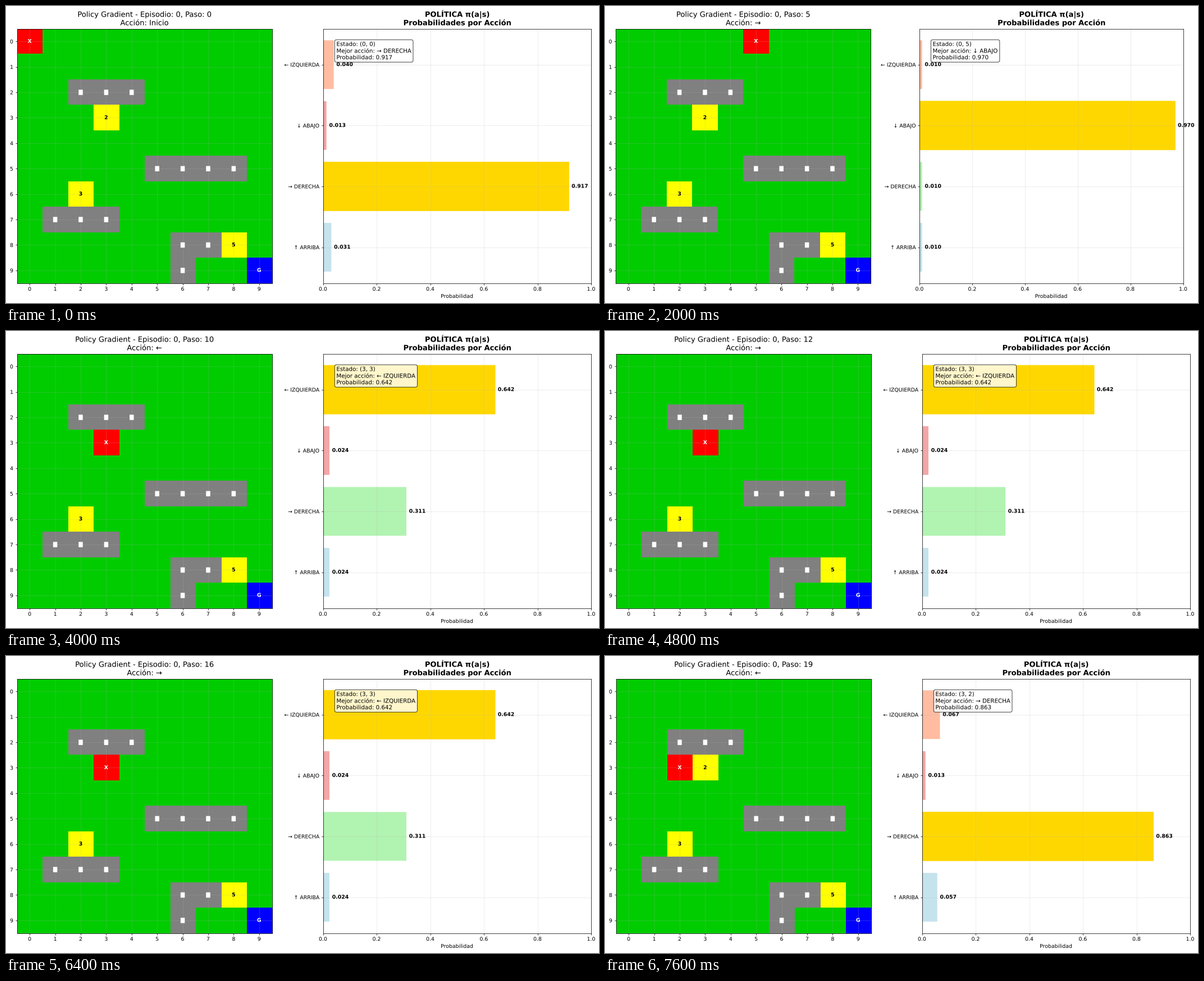
Recreate the animation shown at these times as a matplotlib script. Size 1056 by 530 pixels, loop 8 s.

```python
import numpy as np
import matplotlib.pyplot as plt
from matplotlib.animation import FuncAnimation
from matplotlib.patches import Rectangle
from matplotlib.patheffects import Normal
from matplotlib.text import Text

W, H, DPI = 1056, 530, 67.2
TOP, SIDE = 40.6, 454          # shared top edge and height of both panels, px
SIZE = 10                      # cells per side

plt.rcParams["font.family"] = "DejaVu Sans"

GREEN, GRAY, YELLOW = (0, 204, 0), (128, 128, 128), (255, 255, 0)
RED, BLUE = (255, 0, 0), (0, 0, 255)
WALL_RUNS = [(2, 2, 4), (5, 5, 8), (7, 1, 3), (8, 6, 7), (9, 6, 6)]
WALLS = [(row, col) for row, first, last in WALL_RUNS
         for col in range(first, last + 1)]
REWARDS = {(3, 3): "2", (6, 2): "3", (8, 8): "5"}
GOAL = (9, 9)

ACTIONS = ["↑ ARRIBA", "→ DERECHA", "↓ ABAJO", "← IZQUIERDA"]
ARROWS = [action[0] for action in ACTIONS]
COLORS = ["lightblue", "lightgreen", "lightcoral", "lightsalmon"]
DELTA = dict(zip(ARROWS, [(-1, 0), (0, 1), (1, 0), (0, -1)]))
MOVES = "→" * 5 + "↓" * 3 + "←" * 3 + "→←" * 4
CORRIDOR = range(1, 10)        # steps at which the policy is nearly certain

# Softer policies where the agent starts and where it gets stuck
SOFT_POLICY = {(0, 0): (.031, .917, .013, .040),
               (3, 3): (.024, .311, .024, .642),
               (3, 2): (.057, .863, .013, .067)}

PATH = [(0, 0)]
for move in MOVES:
    PATH.append(tuple(a + b for a, b in zip(PATH[-1], DELTA[move])))

fig = plt.figure(figsize=((W + 1e-6) / DPI, (H + 1e-6) / DPI), dpi=DPI,
                 facecolor="white")
world = fig.add_axes([0, 0, 1, 1])
chart = fig.add_axes([0, 0, 1, 1])


def policy(step):
    """Action probabilities at a step, in the order of ACTIONS."""
    if step not in CORRIDOR:
        return np.array(SOFT_POLICY[PATH[step]])
    turning = MOVES[step] != MOVES[step - 1]
    best = 0.97 if turning or step % 4 == 3 else 0.95
    probs = np.full(4, (1 - best) / 3)
    probs[ARROWS.index(MOVES[step])] = best
    return probs


def place(ax, left, width):
    ax.set_position([left / W, 1 - (TOP + SIDE) / H, width / W, SIDE / H])


def fit_layout(best):
    """Shrink the panels so that the longest bar's label stays on the page."""
    squeeze = max(0, (best - 0.944) / 0.026)
    place(world, 19.5 - 0.4 * squeeze, SIDE)
    place(chart, 564.5 - 4.5 * squeeze, 477.5 - 8 * squeeze)


def cell_text(cell, text, color):
    world.text(cell[1], cell[0], text, color=color, fontsize=10,
               weight="bold", ha="center", va="center")


def draw_world(step):
    agent = PATH[step]
    world.clear()
    grid = np.full((SIZE, SIZE, 3), GREEN, dtype=np.uint8)
    for cells, color in [(WALLS, GRAY), (REWARDS, YELLOW),
                         ([GOAL], BLUE), ([agent], RED)]:
        for cell in cells:
            grid[cell] = color
    world.imshow(grid, aspect="auto", interpolation="nearest")

    w, h = 7.5 * SIZE / SIDE, 9.5 * SIZE / SIDE
    for row, col in WALLS:
        world.add_patch(Rectangle((col - w / 2, row - h / 2), w, h, lw=0,
                                  color="white", zorder=3, snap=False))
    for cell, value in REWARDS.items():
        if cell != agent:
            cell_text(cell, value, "black")
    cell_text(GOAL, "G", "white")
    cell_text(agent, "X", "white")

    world.set_xticks(range(SIZE))
    world.set_yticks(range(SIZE))
    world.grid(True, alpha=0.3)
    action = MOVES[step - 1] if step else "Inicio"
    world.set_title(f"Policy Gradient - Episodio: 0, Paso: {step}\n"
                    f"Acción: {action}", fontsize=14, pad=6.7)


def draw_chart(agent, probs):
    chart.clear()
    best = int(np.argmax(probs))
    bars = chart.barh(range(4), probs, color=COLORS, alpha=0.7, snap=False)
    bars[best].set_color("gold")
    bars[best].set_alpha(1)
    for i, p in enumerate(probs):
        chart.text(p + 0.01, i, f"{p:.3f}", weight="bold", va="center")

    chart.set_xlim(0, 1)
    chart.set_ylim(-0.59, 3.59)
    chart.set_yticks(range(4), ACTIONS)
    chart.set_xlabel("Probabilidad")
    chart.set_title("POLÍTICA π(a|s)\nProbabilidades por Acción",
                    fontsize=14, weight="bold", pad=6.7)
    chart.grid(True, alpha=0.3)
    chart.text(0.05, 0.95,
               f"Estado: {agent}\nMejor acción: {ACTIONS[best]}\n"
               f"Probabilidad: {probs[best]:.3f}",
               transform=chart.transAxes, fontsize=11, va="top",
               bbox=dict(boxstyle="round", facecolor="white", alpha=0.8))


def update(step):
    probs = policy(step)
    fit_layout(probs.max())
    draw_world(step)
    draw_chart(PATH[step], probs)
    # Outline text is placed at fractions of a pixel
    for text in fig.findobj(Text):
        text.set_path_effects([Normal()])
    return []


anim = FuncAnimation(fig, update, frames=len(PATH), interval=400,
                     init_func=lambda: [], repeat=True, repeat_delay=0)
plt.show()
```
